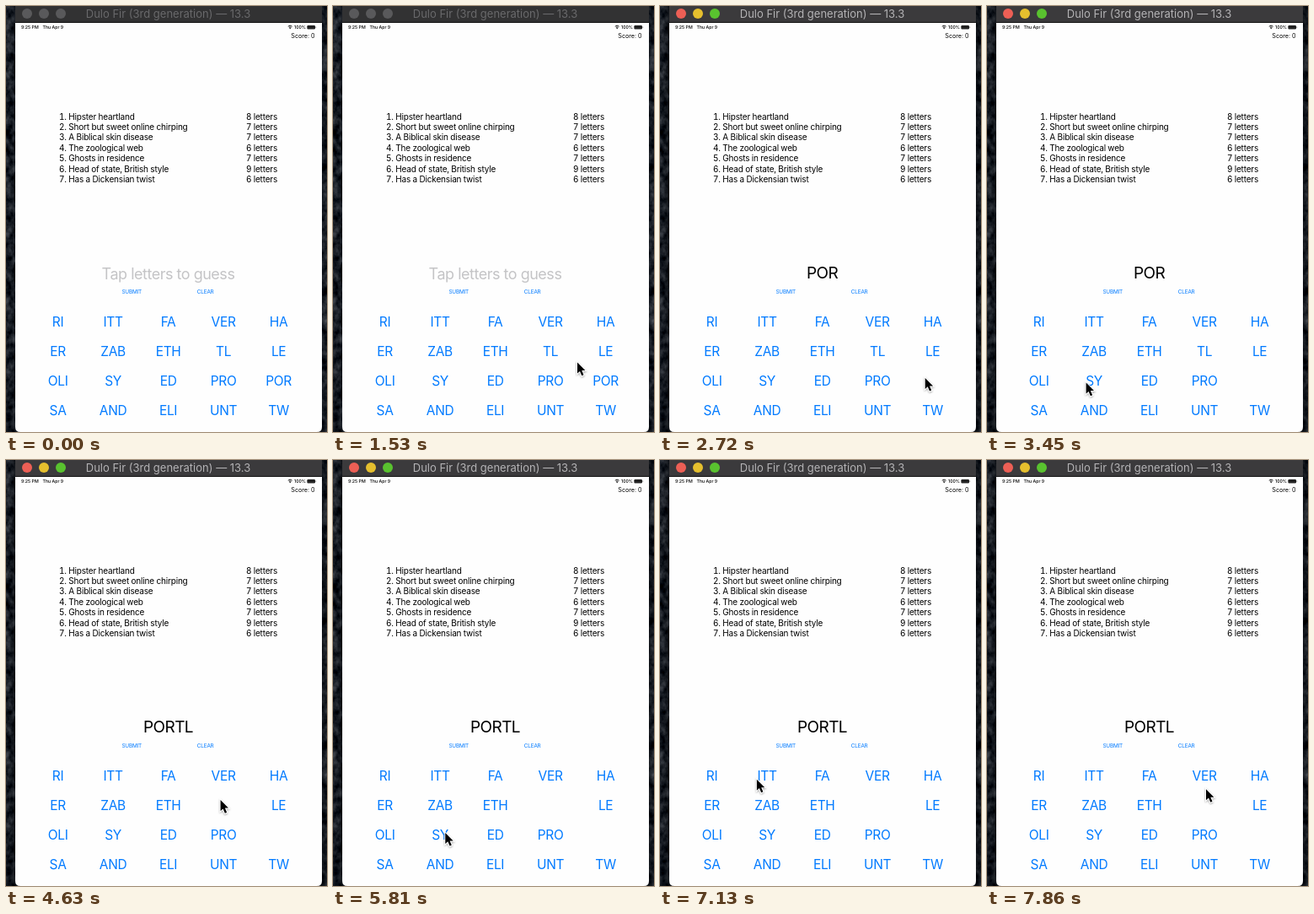
These frames come from a looping animation (381 px wide and 505 px high, 8000 ms). An HTML page:

```html
<!DOCTYPE html>
<html lang="en">
<head>
<meta charset="utf-8">
<title>Word puzzle</title>
<style>
  html, body { margin: 0; width: 100%; height: 100%; overflow: hidden; background: #12151b; }
  svg { display: block; width: 381px; height: 505px; font-family: Inter, "Open Sans", sans-serif; }
  .mid { text-anchor: middle; }
  .end { text-anchor: end; }
  #bar { fill: #323233; }
  #title { font-size: 13px; fill: #69696b; }
  #dots circle { fill: #59595b; }
  .active #bar { fill: #3b3a3c; }
  .active #title { fill: #b4b3b5; }
  .active #dots :nth-child(1) { fill: #ed5f55; }
  .active #dots :nth-child(2) { fill: #e5bf2e; }
  .active #dots :nth-child(3) { fill: #59c22f; }
  #shade { opacity: .2; }
  .active #shade { opacity: .45; }
  .status { font-size: 5.2px; font-weight: 500; }
  #score { font-size: 7.2px; letter-spacing: -.005em; }
  #clues { font-size: 10px; letter-spacing: -.018em; font-variant-numeric: tabular-nums; }
  #letters { font-size: 15.5px; letter-spacing: -.022em; }
  .small { font-size: 6.4px; letter-spacing: -.03em; }
  #letters, .small { fill: #007aff; }
  #hint { font-size: 18px; letter-spacing: -.027em; fill: #c4c4c6; }
  #answer { font-size: 19px; letter-spacing: -.03em; }
</style>
</head>
<body>
<svg id="stage" viewBox="0 0 381 505">
  <defs>
    <filter id="rock" x="0" y="0" width="1" height="1" color-interpolation-filters="sRGB">
      <feTurbulence type="fractalNoise" baseFrequency=".12 .09" numOctaves="4" seed="7"/>
      <feColorMatrix values=".5 0 0 0 -.16  .5 0 0 0 -.14  .5 0 0 0 -.11  0 0 0 0 1"/>
    </filter>
    <filter id="soft" x="-1" y="-1" width="3" height="3"><feGaussianBlur stdDeviation="4"/></filter>
    <filter id="drop" x="-.5" y="-.5" width="2" height="2">
      <feDropShadow dx="0" dy="1" stdDeviation=".9" flood-opacity=".4"/>
    </filter>
  </defs>

  <rect width="381" height="505" filter="url(#rock)"/>
  <rect id="shade" x="8" y="-20" width="370" height="540" filter="url(#soft)"/>
  <path d="M11 0H375V499Q375 505 369 505H17Q11 505 11 499Z" fill="#fefefe"/>
  <rect id="bar" x="11" width="364" height="19.5"/>
  <rect x="11" y="19" width="364" height="1" fill="#111"/>
  <g id="dots"><circle cx="25" cy="9" r="6"/><circle cx="45" cy="9" r="6"/><circle cx="65" cy="9" r="6"/></g>
  <text id="title" class="mid" x="192.5" y="14">Dulo Fir (3rd generation) — 13.3</text>

  <text class="status" x="18" y="27">9:25 PM</text>
  <text class="status" x="43.5" y="27">Thu Apr 9</text>
  <text class="status end" x="356" y="27">100%</text>
  <path d="M334.8 24.2Q337.2 22.2 339.6 24.2M335.9 25.5Q337.2 24.4 338.5 25.5" fill="none" stroke="#000" stroke-width=".9"/>
  <circle cx="337.2" cy="26.5" r=".7"/>
  <rect x="357.4" y="23" width="9.6" height="4.4" rx="1.2" fill="#222"/>
  <rect x="367.5" y="24.4" width=".7" height="1.6" fill="#777"/>
  <text id="score" class="end" x="366.5" y="37.6">Score: 0</text>

  <g id="clues"></g>
  <text id="hint" class="mid" x="192.5" y="324">Tap letters to guess</text>
  <text id="answer" class="mid" x="192.5" y="323.4"></text>
  <text class="small mid" x="149.2" y="340.8">SUBMIT</text>
  <text class="small mid" x="236.7" y="340.8">CLEAR</text>
  <g id="letters"></g>

  <g id="cursor" filter="url(#drop)">
    <path d="M0 .6V13.6L3 10.9L5.3 16.2L7.5 15.2L5.3 10.1H9.4Z" stroke="#fff" stroke-width="1.8" paint-order="stroke"/>
  </g>
</svg>
<script>
const $ = id => document.getElementById(id);
const LOOP = 8000, LEAD = 500, STEP = 146.6;
const ACTIVATE = 13, TAP_POR = 14, TAP_TL = 28;

function addText(parent, x, y, str, cls = '') {
  const el = document.createElementNS('http://www.w3.org/2000/svg', 'text');
  el.setAttribute('x', x);
  el.setAttribute('y', y);
  el.setAttribute('class', cls);
  el.textContent = str;
  $(parent).append(el);
  return el;
}

[['Hipster heartland', 8], ['Short but sweet online chirping', 7], ['A Biblical skin disease', 7],
 ['The zoological web', 6], ['Ghosts in residence', 7], ['Head of state, British style', 9],
 ['Has a Dickensian twist', 6]].forEach(([clue, count], i) => {
  const y = 134.6 + i * 12.43;
  addText('clues', 63, y, `${i + 1}. ${clue}`);
  addText('clues', 322, y, `${count} letters`, 'end');
});

const buttons = {};
'RI ITT FA VER HA ER ZAB ETH TL LE OLI SY ED PRO POR SA AND ELI UNT TW'.split(' ').forEach((s, i) => {
  buttons[s] = addText('letters', 61.6 + i % 5 * 65.5, 380.2 + Math.floor(i / 5) * 35, s, 'mid');
});

// Pointer strokes: first step, last step, end point
const entry = [262, 485];
const strokes = [
  [0, 4, 262, 405], [4, 7, 290, 422], [7, 11, 314.7, 440.3],
  [15, 20, 117.6, 446], [20, 22, 107, 446], [22, 26, 254.6, 402.5],
  [30, 34, 107.5, 440], [35, 38, 207, 462], [38, 41, 109.6, 417],
  [41, 43, 79, 384], [43, 50, 260, 389.6]
];

// Each stroke eases in and out and bows: up going right, down going left.
function pointerAt(k) {
  let [x, y] = entry;
  for (const [from, to, endX, endY] of strokes) {
    if (k <= from) break;
    const u = Math.min(1, (k - from) / (to - from));
    const ease = u * u * (3 - 2 * u), dx = endX - x;
    x += dx * ease;
    y += (endY - y) * ease - .05 * dx * Math.sin(Math.PI * u);
  }
  return [x, y];
}

const show = (el, on) => el.style.display = on ? '' : 'none';

function draw(ms) {
  const k = Math.floor((ms - LEAD) / STEP);
  const por = k >= TAP_POR, tl = k >= TAP_TL;
  $('stage').classList.toggle('active', k >= ACTIVATE);
  show($('hint'), !por);
  show(buttons.POR, !por);
  show(buttons.TL, !tl);
  $('answer').textContent = tl ? 'PORTL' : por ? 'POR' : '';
  show($('cursor'), k >= 0);
  $('cursor').setAttribute('transform', `translate(${pointerAt(k)})`);
}

const start = performance.now();
function tick() {
  draw((performance.now() - start) % LOOP);
  requestAnimationFrame(tick);
}
tick();
</script>
</body>
</html>
```
